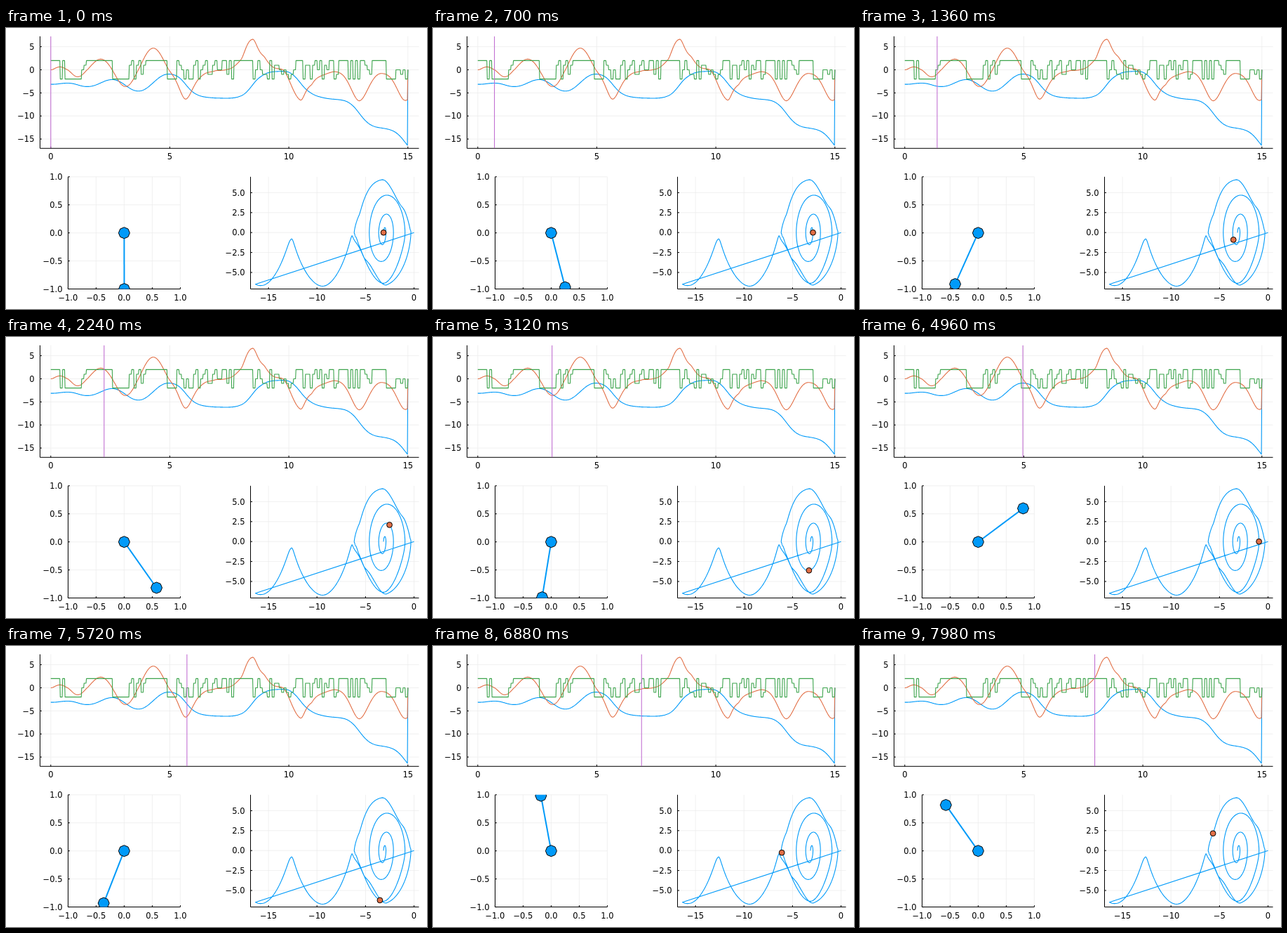
Animation, 600 px wide and 400 px high, one loop 8000 ms. Source, as an HTML page:

```html
<!DOCTYPE html>
<html lang="en">
<head>
<meta charset="utf-8">
<title>Pendulum swing-up</title>
<style>
html, body { margin: 0; width: 100%; height: 100%; overflow: hidden; background: #fff; }
svg { display: block; width: 600px; height: 400px; }
text { font: 11.5px "DejaVu Sans", sans-serif; fill: #000; }
</style>
</head>
<body>
<svg id="stage" viewBox="0 0 600 400"></svg>
<script>
const BLUE = '#009af9', ORANGE = '#e26f46', GREEN = '#3da44d', PURPLE = '#c271d2';
const LOOP = 8000, STEP = 20, DT = 0.02, N = 750, GRAVITY = 9.8;
const stage = document.getElementById('stage');

// Key poses: time, angle, angular velocity (zero at turning points)
const poses = [
  [0, -3.14, 0], [.7, -2.89, 0], [1.53, -3.64, 0], [2.58, -2.12, 0], [3.68, -4.61, 0], [4.96, -.93, 0],
  [5.67, -3.2, -6.35], [6.4, -5.82, -1.1], [6.88, -6.1, -.26], [7.4, -6.16, .05], [7.98, -5.67, 2.15],
  [8.47, -3.33, 6.62], [9, -.92, 2.6], [9.75, -.32, 0], [10.48, -2.8, -6.55], [11, -5.25, -2.9],
  [12, -6.42, -.45], [12.94, -9.3, -6.7], [14, -12.7, -.87], [14.86, -15.55, -6.6], [15, -16.47, -6.35]
];

// Quintic between poses; gravity gives the acceleration at both ends
function angleAt(t) {
  let i = 0;
  while (i < poses.length - 2 && t >= poses[i + 1][0]) i++;
  const [t0, a, v0] = poses[i], [t1, b, v1] = poses[i + 1];
  const h = t1 - t0, s = (t - t0) / h;
  const g0 = GRAVITY * Math.sin(a) * h * h, g1 = GRAVITY * Math.sin(b) * h * h;
  const d = b - a - v0 * h - g0 / 2, e = (v1 - v0) * h - g0, f = g1 - g0;
  return a + s * (v0 * h + s * (g0 / 2 +
    s * (10 * d - 4 * e + f / 2 + s * (7 * e - 15 * d - f + s * (6 * d - 3 * e + f / 2)))));
}

function velocityAt(t) {
  const e = 1e-3;
  return (angleAt(t + e) - angleAt(t - e)) / (2 * e);
}

// Torque in steps of 0.1 s: long pushes [from, to, level], seeded noise between
const pushes = [
  [0, 3, 2], [6, 13, -2], [15, 26, 2], [26, 31, -2], [40, 49, 2], [49, 53, -2],
  [77, 84, 2], [135, 141, 2], [141, 145, -2]
];
let seed = 7;
function random() {
  seed = (seed * 1664525 + 1013904223) % 4294967296;
  return seed / 4294967296;
}
const torque = Array.from({ length: 151 }, (_, k) => {
  const noise = Math.max(-2, Math.min(2, Math.round(random() * 6 - 3)));
  const push = pushes.find(([from, to]) => k >= from && k < to);
  return push ? push[2] : noise;
});

const times = Array.from({ length: N + 1 }, (_, i) => i * DT);
const theta = times.map(angleAt), omega = times.map(velocityAt);
const control = times.map((_, i) => torque[Math.floor(i / 5)]);
// The recording ends on an empty sample
omega[N] = theta[N] = control[N] = 0;

function add(tag, attrs, parent = stage) {
  const el = document.createElementNS('http://www.w3.org/2000/svg', tag);
  for (const key in attrs) el.setAttribute(key, attrs[key]);
  parent.appendChild(el);
  return el;
}

function line(x1, y1, x2, y2, stroke, width = 1, parent = stage) {
  return add('line', { x1, y1, x2, y2, stroke, 'stroke-width': width }, parent);
}

function label(x, y, value, anchor, digits) {
  add('text', { x, y, 'text-anchor': anchor }).textContent =
    value.toFixed(digits).replace('-', '\u2212');
}

const range = (from, to, step) =>
  Array.from({ length: Math.round((to - from) / step) + 1 }, (_, i) => from + i * step);

// Axes with linear scales; returns the scales and a clipped layer
function plot(id, [left, top, right, bottom], x, y, xs, ys, xDigits, yDigits) {
  for (const v of xs) {
    line(x(v), top, x(v), bottom, '#ededed', .8);
    line(x(v), bottom, x(v), bottom - 2.5, '#000');
    label(x(v), bottom + 16, v, 'middle', xDigits);
  }
  for (const v of ys) {
    line(left, y(v), right, y(v), '#ededed', .8);
    line(left, y(v), left + 2.5, y(v), '#000');
    label(left - 8, y(v) + 4.2, v, 'end', yDigits);
  }
  add('path', { d: `M${left} ${top}V${bottom}H${right}`, fill: 'none', stroke: '#000' });
  const clip = add('clipPath', { id });
  add('rect', { x: left, y: top, width: right - left, height: bottom - top }, clip);
  return { x, y, layer: add('g', { 'clip-path': `url(#${id})` }) };
}

function curve(p, xs, ys, stroke) {
  const d = xs.map((v, i) => (i ? 'L' : 'M') + p.x(v).toFixed(2) + ' ' + p.y(ys[i]).toFixed(2)).join('');
  add('path', { d, fill: 'none', stroke, 'stroke-width': 1.1, 'stroke-linejoin': 'round' }, p.layer);
}

const series = plot('c1', [48.5, 11.8, 588.5, 171.3], v => 63.8 + 33.93 * v, v => 59.5 - 6.57 * v,
  range(0, 15, 5), range(-15, 5, 5), 0, 0);
const arm = plot('c2', [88.5, 211.8, 248.5, 371.5], v => 168.4 + 80 * v, v => 291.7 - 79.9 * v,
  range(-1, 1, .5), range(-1, 1, .5), 1, 1);
const phase = plot('c3', [348.5, 211.8, 588.5, 371.5], v => 581.5 + 13.83 * v, v => 291.2 - 11.36 * v,
  range(-15, 0, 5), range(-5, 5, 2.5), 0, 1);

curve(series, times, theta, BLUE);
curve(series, times, omega, ORANGE);
curve(series, times, control, GREEN);
const cursor = line(0, 11.8, 0, 171.3, PURPLE, 1.1, series.layer);

const hub = [arm.x(0), arm.y(0)];
const rod = line(...hub, ...hub, BLUE, 2, arm.layer);
const corners = range(0, 7, 1).map(i => {
  const a = i * Math.PI / 4;
  return (8 * Math.cos(a)).toFixed(2) + ',' + (8 * Math.sin(a)).toFixed(2);
}).join(' ');
const knob = () => add('polygon', { points: corners, fill: BLUE, stroke: '#000' }, arm.layer);
const move = (el, x, y) => el.setAttribute('transform', `translate(${x} ${y})`);
move(knob(), ...hub);
const tip = knob();

curve(phase, theta, omega, BLUE);
const dot = add('circle', { r: 3.9, fill: ORANGE, stroke: '#000' }, phase.layer);

function draw(ms) {
  const i = Math.floor(ms % LOOP / STEP), a = theta[i];
  const x = arm.x(-Math.sin(a)), y = arm.y(Math.cos(a)), cx = series.x(times[i]);
  cursor.setAttribute('x1', cx);
  cursor.setAttribute('x2', cx);
  rod.setAttribute('x2', x);
  rod.setAttribute('y2', y);
  move(tip, x, y);
  move(dot, phase.x(a), phase.y(omega[i]));
}

const start = performance.now();
function tick() {
  draw(performance.now() - start);
  requestAnimationFrame(tick);
}
tick();
</script>
</body>
</html>
```
